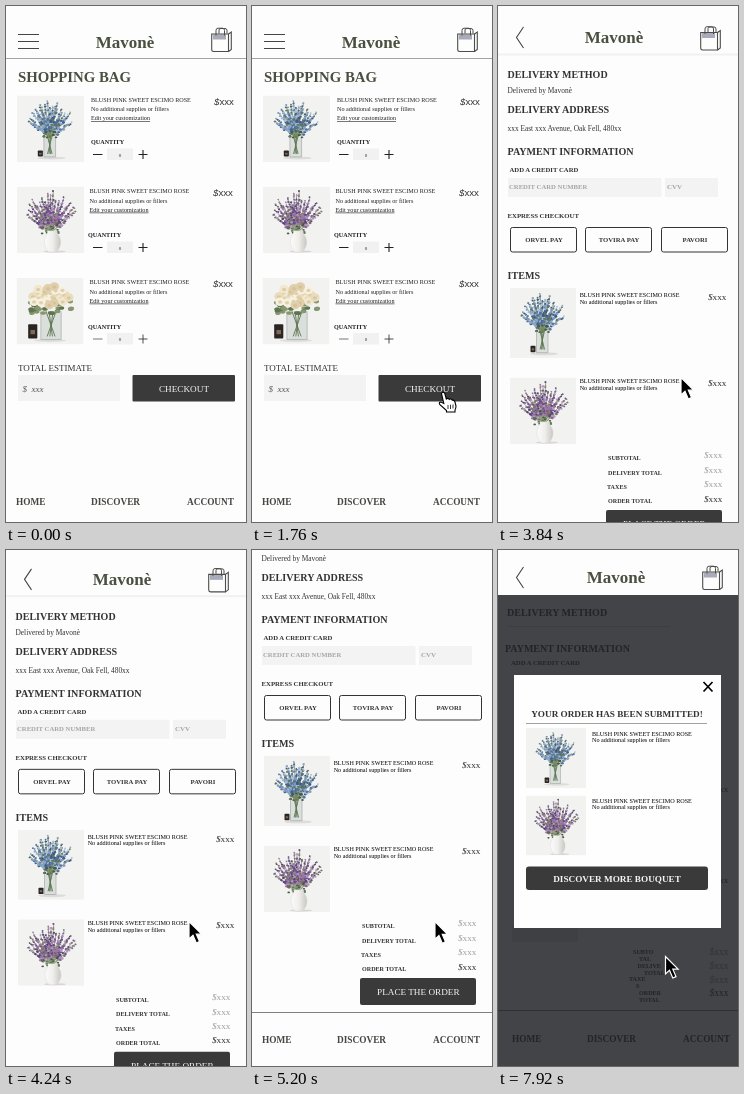
An HTML page for the animation above (8000 ms loop, 240x516 px).

```html
<!DOCTYPE html>
<html lang="en">
<head>
<meta charset="utf-8">
<title>Flower shop checkout</title>
<style>
html, body { margin: 0; width: 100%; height: 100%; overflow: hidden; background: #fdfdfd; }
svg { display: block; width: 100vw; height: 100vh; }
text { font-family: "Liberation Serif", "Times New Roman", serif; white-space: pre; }
</style>
</head>
<body>
<svg id="stage" viewBox="0 0 240 516" xmlns="http://www.w3.org/2000/svg"></svg>
<script>
const INK = '#333333', OLIVE = '#4a503f', DARK = '#3a3a3a', PALE = '#f3f3f3';
const PAPER = '#fdfdfd', DIM = '#424448', DIM_INK = '#222427';
const BRAND = 'Mavonè';

// Markup helpers
const text = (x, y, s, size, fill = INK, extra = '') =>
  `<text x="${x}" y="${y}" font-size="${size}" fill="${fill}" ${extra}>${s}</text>`;
const bold = (x, y, s, size, fill, extra = '') =>
  text(x, y, s, size, fill, 'font-weight="700" ' + extra);
const rect = (x, y, w, h, fill, extra = '') =>
  `<rect x="${x}" y="${y}" width="${w}" height="${h}" fill="${fill}" ${extra}/>`;
const path = (d, stroke, width = 1, fill = 'none') =>
  `<path d="${d}" stroke="${stroke}" stroke-width="${width}" fill="${fill}"/>`;
const ellipse = (x, y, rx, ry, fill, extra = '') =>
  `<ellipse cx="${x.toFixed(1)}" cy="${y.toFixed(1)}" rx="${rx.toFixed(1)}" ry="${ry.toFixed(1)}" fill="${fill}" ${extra}/>`;
const group = (id, body) => `<g id="${id}">${body}</g>`;
const photo = (id, x, y, w, h) =>
  `<use href="#${id}" x="${x}" y="${y}" width="${w}" height="${h}"/>`;
const MID = 'text-anchor="middle"';

function price(x, y, size, fill = INK, family = 'serif') {
  const font = family === 'sans' ? `style="font-family:'Liberation Sans',Arial,sans-serif"` : '';
  return text(x, y, '<tspan font-style="italic">$</tspan>xxx', size, fill, font);
}

// Bouquets
function seeded(seed) {
  return () => (seed = (seed * 16807) % 2147483647) / 2147483647;
}

// A fan of flower spikes rising from (cx, base)
function spikes(seed, cx, base, spread, height, colours) {
  const rnd = seeded(seed), count = 19;
  let stems = '', petals = '';
  for (let i = 0; i < count; i++) {
    const side = i / (count - 1) * 2 - 1;
    const dx = side * spread * (0.85 + rnd() * 0.15);
    const dy = height * (1 - 0.45 * side * side) * (0.72 + rnd() * 0.28);
    stems += path(`M${cx} ${base}L${(cx + dx).toFixed(1)} ${(base - dy).toFixed(1)}`, '#75895f', 0.7);
    for (let k = 0; k < 15; k++) {
      const f = 0.3 + k / 14 * 0.7, r = 1.9 - f;
      petals += ellipse(cx + dx * f + (rnd() - 0.5) * 4.5 * (1.2 - f), base - dy * f + (rnd() - 0.5) * 3,
        r, r * 0.85, colours[Math.floor(rnd() * colours.length)]);
    }
  }
  for (let i = 0; i < 22; i++)
    petals += ellipse(cx - 9 + rnd() * 18, base - rnd() * 13, 1.3, 0.9, i % 2 ? '#66795a' : '#465b43');
  return stems + petals;
}

function roses() {
  const rnd = seeded(77);
  const tones = ['#f2e8cf', '#e9dcbb', '#f7f0df', '#dfcfaa'];
  let out = '';
  for (let i = 0; i < 34; i++)
    out += ellipse(14 + rnd() * 40, 23 + rnd() * 12, 2.8, 1.8, i % 2 ? '#5f7450' : '#87966c');
  for (let i = 0; i < 24; i++) {
    const a = i * 2.4, r = Math.sqrt(i / 24), x = 33 + Math.cos(a) * r * 20, y = 18 + Math.sin(a) * r * 10;
    out += ellipse(x, y, 4.6, 4.2, tones[i % 4]) + ellipse(x, y + 0.4, 2, 1.7, '#cfbb90', 'opacity=".6"');
  }
  return out;
}

const glass = (x, y, w, h) =>
  rect(x, y, w, h, '#d3d9d5', 'rx="1.5" opacity=".75"') +
  path([0.25, 0.4, 0.6, 0.75].map((f, i) => `M${x + w * f} ${y}L${x + w * (0.7 - i * 0.13)} ${y + h - 3}`).join(''), '#5f7654', 0.9) +
  path(`M${x} ${y}V${y + h}H${x + w}V${y}`, '#9aa39f', 0.6);
const candle = (x, y, w, h) => rect(x, y, w, h, '#2a2522', 'rx=".8"') + rect(x + w * 0.25, y + h * 0.4, w * 0.5, h * 0.3, '#7d6b58');
const symbol = (id, body) =>
  `<symbol id="${id}" viewBox="0 0 66 66" preserveAspectRatio="none">${rect(0, 0, 66, 66, '#f2f2f1')}${body}</symbol>`;

const defs = '<defs>' +
  '<linearGradient id="china"><stop stop-color="#fbfbfa"/><stop offset=".5" stop-color="#efeeeb"/><stop offset="1" stop-color="#c9c7c2"/></linearGradient>' +
  symbol('blue', ellipse(34, 62, 14, 1.5, '#dcdcda') + glass(26.5, 38, 11.5, 23) +
    spikes(41, 32.5, 42, 25, 38, ['#7d9bc2', '#55759f', '#a9c0dc', '#3f5b82', '#8ba6c6', '#5f7566']) + candle(20.5, 54.500, 5, 6)) +
  symbol('purple', ellipse(37, 64.5, 11, 1, '#d6d6d3') +
    spikes(93, 33, 47, 27, 45, ['#8c6ea8', '#6a4c88', '#b196c2', '#a2779f', '#57436f', '#7a7469']) +
    path('M30 44H39.500C39 48 43 49 43 55C43 60 40 64 38.500 65H31.500C30 64 27 60 27 55C27 49 30.500 48 30 44Z', '#d3d2ce', 0.4, 'url(#china)')) +
  symbol('cream', ellipse(33, 62, 16, 1.5, '#dcdcda') + glass(24, 33, 20, 28) + roses() + candle(11.5, 46, 9, 14)) +
  '</defs>';

// Shared pieces
const bag = (x, y) => `<g transform="translate(${x} ${y})">` +
  rect(2, 7, 13, 5, '#a9abba') +
  path('M.7 6.500H17.500V24H2.500Q.7 24 .7 22Z', '#4a4d49', 1.1) +
  path('M17.500 6.500L20.300 4.500V22L17.500 24', '#4a4d49', 1.1) +
  path('M5 8V3Q5 .7 7 .7H11.500Q13.500 .7 13.500 3V8M8 6V2.500Q8 1 10 1H14Q16 1 16 3V6', '#4a4d49', 1) + '</g>';
const logo = (x, y) => bold(x, y, BRAND, 17, OLIVE, MID);
const chevron = y => path(`M25.500 ${y}L18.500 ${y + 10.5}L25.500 ${y + 21}`, '#444', 1.1);
const nav = (y, dx = 0, fill = '#444741') =>
  bold(10 + dx, y, 'HOME', 9.3, fill) + bold(85 + dx, y, 'DISCOVER', 9.3, fill) + bold(181 + dx, y, 'ACCOUNT', 9.3, fill);
const product = (x, y, gap, fill) =>
  text(x, y, 'BLUSH PINK SWEET ESCIMO ROSE', 6.15, fill) +
  text(x, y + gap, 'No additional supplies or fillers', 6.15, fill);

// Shopping bag
function bagRow(id, px, py, tx, y, qx, qy, priceX, faint) {
  const cy = qy + 10.5;
  return photo(id, px, py, 67, 66.5) + product(tx, y, 9.2, '#222') +
    text(tx, y + 18.3, 'Edit your customization', 6.15, '#222', 'text-decoration="underline"') +
    bold(qx, qy, 'QUANTITY', 6.15, '#222') + rect(101, cy - 6, 26, 11.5, '#f1f1f1') +
    text(114, cy + 2, '0', 5, '#333', MID) +
    path(`M87 ${cy}h9.500`, faint ? '#777' : '#222') +
    path(`M132.500 ${cy}h9M137 ${cy - 4.5}v9`, '#222', faint ? 0.8 : 1.1) +
    price(priceX, y + 3, 9.7, '#333', 'sans');
}

const bagPage = rect(0, 0, 240, 516, PAPER) +
  path('M12 28.500H33M12 35.500H33M12 42.500H33', '#444', 1) + logo(119, 41.5) + bag(205, 21.5) +
  path('M0 52.500H240', '#a3a3a3') + bold(12, 76, 'SHOPPING BAG', 14.8, OLIVE) +
  bagRow('blue', 11, 89.5, 85, 96, 85, 138, 208) +
  bagRow('purple', 11, 180.5, 83.5, 187.3, 82, 231, 207) +
  bagRow('cream', 10.5, 272, 83.5, 278.3, 82, 322.5, 207, true) +
  text(12, 365, 'TOTAL ESTIMATE', 9) + rect(12, 369, 102, 26, PALE) +
  text(16.5, 386, '$  xxx', 9, '#555', 'font-style="italic"') +
  rect(126.5, 369, 102.5, 26.5, DARK, 'rx="1"') + text(178, 386, 'CHECKOUT', 9.2, '#f4f4f4', MID) + nav(498.5);

// Payment page, laid out as seen when scrolled to its end
const payButton = (x, label) =>
  rect(x, 145.5, 66, 24.5, 'none', `rx="2" stroke="${INK}"`) + bold(x + 33.5, 160, label, 6.7, INK, MID);
const sums = ['SUBTOTAL', 'DELIVERY TOTAL', 'TAXES', 'ORDER TOTAL'];

const payPage = chevron(-55) + logo(116, -39) + bag(202, -56) + path('M0 -27.500H240', '#f1f1f1', 2) +
  bold(9.5, -4.3, 'DELIVERY METHOD', 10) + text(9.5, 10.7, 'Delivered by ' + BRAND, 7.4) +
  bold(9.5, 31.2, 'DELIVERY ADDRESS', 10.1) + text(9.5, 49.3, 'xxx East xxx Avenue, Oak Fell, 480xx', 7.4) +
  bold(9.5, 73.2, 'PAYMENT INFORMATION', 10.1) + bold(11.5, 90.3, 'ADD A CREDIT CARD', 6.7) +
  rect(10, 96, 153.5, 19, PALE) + rect(167, 96, 53, 19, PALE) +
  bold(11, 107.4, 'CREDIT CARD NUMBER', 6.7, '#a5a5a5') + bold(169, 107.4, 'CVV', 7, '#a5a5a5') +
  bold(9.5, 136, 'EXPRESS CHECKOUT', 6.75) +
  payButton(12.5, 'ORVEL PAY') + payButton(87.5, 'TOVIRA PAY') + payButton(163.5, 'PAVORI') +
  bold(9.5, 197.2, 'ITEMS', 10.1) +
  photo('blue', 12, 206, 66, 70) + product(81.7, 215, 6.6, '#000') + price(210, 218, 9.2) +
  photo('purple', 12, 295.5, 66, 66.5) + product(81.7, 301.2, 6.6, '#000') + price(210, 304.3, 9.2) +
  sums.map((s, i) => bold(i === 2 ? 109 : 110, 378.3 + i * 14.2, s, 6.1) +
    price(206, 376.4 + i * 14.4, 9.2, i < 3 ? '#a0a0a0' : INK)).join('') +
  rect(108, 428, 116, 27, DARK, 'rx="2"') + text(166.3, 445, 'PLACE THE ORDER', 9.2, '#f4f4f4', MID) +
  path('M0 462.500H240', '#808080') + nav(493.3);

// Confirmation
const dimLines = [[135, 'SUBTO'], [141, 'TAL'], [139.5, 'DELIVE'], [146, 'TOTAL'], [131, 'TAXE'], [138, 'S'], [141, 'ORDER'], [141, 'TOTAL']];
const donePage = rect(0, 0, 240, 516, DIM) + rect(0, 0, 240, 45, PAPER) +
  chevron(17) + logo(118, 33) + bag(204, 15.5) +
  bold(9, 65.7, 'DELIVERY METHOD', 10, DIM_INK) + path('M10 76.500H172', '#3a3c40', 0.8) +
  bold(7, 101.5, 'PAYMENT INFORMATION', 10, DIM_INK) + bold(13, 114.5, 'ADD A CREDIT CARD', 6.7, DIM_INK) +
  rect(14, 376, 66, 16, '#3e4043') + price(212, 242, 9.2, DIM_INK) + price(212, 333, 9.2, DIM_INK) +
  dimLines.map(([x, s], i) => bold(x, 404 + i * 6.85, s, 6.1, DIM_INK)).join('') +
  [0, 1, 2, 3].map(i => price(211.5, 405 + i * 13.8, 9.5, i < 3 ? '#313336' : DIM_INK)).join('') +
  path('M0 460.500H240', '#2e3033') + nav(491.5, 4, DIM_INK) +
  rect(16, 125, 207, 253, '#fefefe') + path('M205.500 132L214.500 141.500M214.500 132L205.500 141.500', '#000', 1.7) +
  bold(119, 167.3, 'YOUR ORDER HAS BEEN SUBMITTED!', 9.2, INK, MID) + path('M28 173.500H209', '#8a8a8a', 0.8) +
  photo('blue', 28, 178, 60, 60) + product(94, 185.8, 6.6, '#000') +
  photo('purple', 28, 245.5, 60, 60) + product(94, 252.8, 6.6, '#000') +
  rect(28, 316.5, 182, 23.5, DARK, 'rx="3"') + bold(119, 331.5, 'DISCOVER MORE BOUQUET', 9.2, '#f6f6f6', MID);

const arrow = path('M0 0V17.500L4 13.800L7.300 21.500L10.500 20.100L7.300 12.700H12.600Z', '#fff', 1.2, '#000');
const hand = path('M-1.500 1.500Q0 -1 1.800 1.500L3.300 7Q5 5.500 6.300 7.400Q8 6.300 9.200 8.200Q11.300 7.600 12 10L13 14Q13 16.500 12 18V20H3.500V18.500L-3.300 12.500Q-4.500 10 -2 10L.8 11.500Z', '#000', 1.1, '#fff') +
  path('M5 13V17M7.500 12.700V17M10 12.500V16.500', '#000', 0.8);

document.getElementById('stage').innerHTML = defs +
  group('bagPage', bagPage) +
  group('pay', rect(0, 0, 240, 516, PAPER) + group('scroll', payPage)) +
  group('done', donePage) + group('arrow', arrow) + group('hand', hand);

const el = {};
for (const id of ['pay', 'scroll', 'done', 'arrow', 'hand']) el[id] = document.getElementById(id);

// Motion
const LOOP = 8000;
const part = (t, a, b) => Math.min(1, Math.max(0, (t - a) / (b - a)));
const easeOut = p => 1 - (1 - p) ** 2;
const easeInOut = p => p * p * (3 - 2 * p);
const SCROLL = 76;

// Each move: start, end, x, y of the pointer's tip on arrival
const moves = [
  [900, 1480, 191, 386],
  [2500, 2950, 183, 371.5],
  [5180, 5860, 169.5, 437.5],
  [6900, 7560, 167.5, 406.5]
];

function pointer(t) {
  let x = 236, y = 474;
  for (const [a, b, tx, ty] of moves) {
    const p = easeInOut(part(t, a, b));
    x += (tx - x) * p;
    y += (ty - y) * p;
  }
  return `translate(${x.toFixed(2)} ${y.toFixed(2)})`;
}

function show(node, opacity) {
  node.setAttribute('opacity', opacity);
  node.setAttribute('visibility', opacity > 0 ? 'visible' : 'hidden');
}

function draw(t) {
  show(el.pay, part(t, 1960, 2200));
  show(el.done, part(t, 6540, 6760));
  const y = SCROLL * (easeOut(part(t, 3420, 3700)) - easeOut(part(t, 4230, 5000)));
  el.scroll.setAttribute('transform', `translate(0 ${y.toFixed(2)})`);
  const pointing = t >= 1400 && t < 2480;
  show(el.arrow, t >= 900 && !pointing ? 1 : 0);
  show(el.hand, pointing ? 1 : 0);
  const at = pointer(t);
  el.arrow.setAttribute('transform', at);
  el.hand.setAttribute('transform', at);
}

const start = performance.now();
function tick() {
  draw((performance.now() - start) % LOOP);
  requestAnimationFrame(tick);
}
draw(0);
requestAnimationFrame(tick);
</script>
</body>
</html>
```
